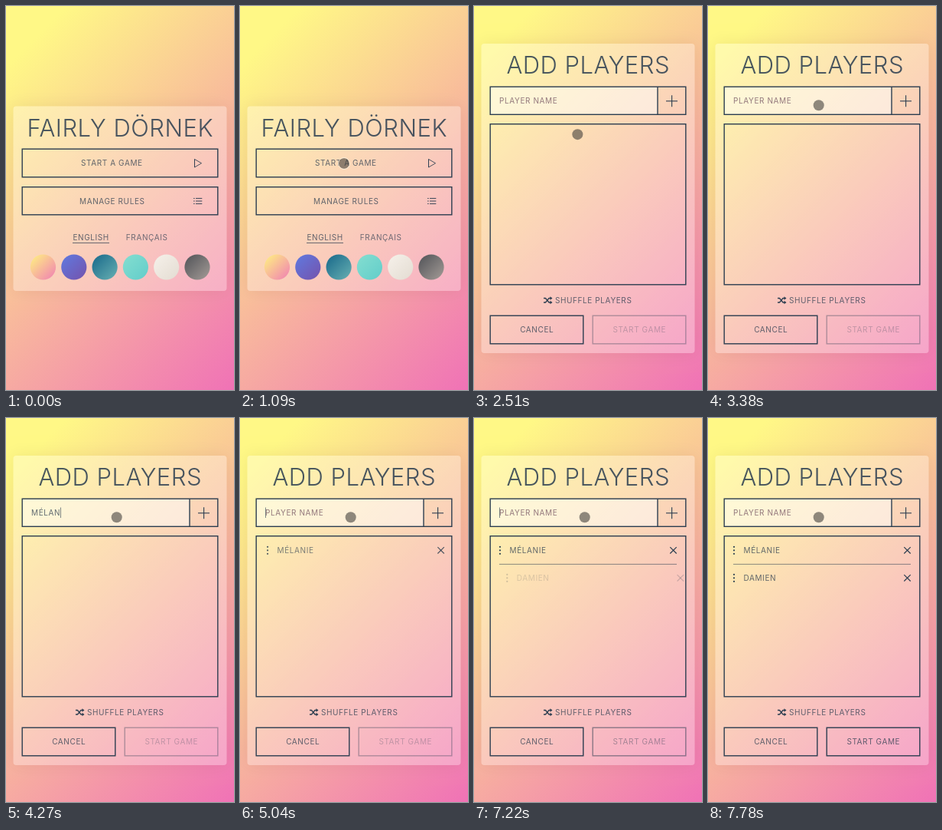
Animation, 298 px wide and 500 px high, one loop 8000 ms. Source, as an HTML page with a canvas:

```html
<!DOCTYPE html>
<html lang="en">
<head>
<meta charset="utf-8">
<title>Add players</title>
<style>
html, body { margin: 0; width: 100%; height: 100%; overflow: hidden; }
canvas { display: block; width: 298px; height: 500px; }
</style>
</head>
<body>
<canvas id="stage"></canvas>
<script>
const W = 298, H = 500, LOOP = 8000, TICK = 110;
const INK = '#2c3e50';
const FONT = 'Inter, "Open Sans", sans-serif';
const canvas = document.getElementById('stage');
const ctx = canvas.getContext('2d');
const dpr = window.devicePixelRatio || 1;
canvas.width = W * dpr;
canvas.height = H * dpr;
ctx.scale(dpr, dpr);

const players = [
  { name: 'MÉLANIE', keys: [3710, 3930, 4040, 4150, 4260, 4380, 4490], added: 4820 },
  { name: 'DAMIEN', keys: [5810, 5910, 6140, 6360, 6460, 6690], added: 7220 }
];
const themes = [
  ['#fff480', '#f07eb4'], ['#5f7ae0', '#7552ac'], ['#17688a', '#68b0b2'],
  ['#84ded0', '#62cdca'], ['#f6f1ea', '#e3dcd2'], ['#505257', '#a49c97']
];

const easeOut = p => 1 - Math.pow(1 - Math.min(1, Math.max(0, p)), 2.2);
const mix = (a, b, p) => a + (b - a) * p;
const ticks = (t, from) => Math.floor((t - from + 6) / TICK);

function diagonal(x, y, w, h, from, to, lead = 0) {
  const cx = x + w / 2, cy = y + h / 2, d = (w + h) / 4;
  const g = ctx.createLinearGradient(cx - d, cy - d, cx + d, cy + d);
  g.addColorStop(lead, from);
  g.addColorStop(1, to);
  return g;
}

function line(points, width = 1, color = INK) {
  ctx.beginPath();
  points.forEach(([x, y], i) => i ? ctx.lineTo(x, y) : ctx.moveTo(x, y));
  ctx.lineWidth = width;
  ctx.strokeStyle = color;
  ctx.stroke();
}

function disc(x, y, r, fill) {
  ctx.beginPath();
  ctx.arc(x, y, r, 0, Math.PI * 2);
  ctx.fillStyle = fill;
  ctx.fill();
}

function box(x, y, w, h) {
  ctx.lineWidth = 1.4;
  ctx.strokeStyle = INK;
  ctx.strokeRect(x + 0.2, y + 0.2, w - 0.4, h - 0.4);
}

function setFont(weight, size, spacing) {
  ctx.font = `${weight} ${size}px ${FONT}`;
  ctx.letterSpacing = spacing + 'px';
}

function label(text, x, y, { align = 'left', alpha = 0.75, color = INK } = {}) {
  ctx.save();
  ctx.globalAlpha *= alpha;
  setFont(400, 10, 0.6);
  ctx.textAlign = align;
  ctx.fillStyle = color;
  ctx.fillText(text, x, y);
  ctx.restore();
}

function title(text, y) {
  ctx.save();
  ctx.globalAlpha = 0.87;
  setFont(300, 31, 0.5);
  ctx.textAlign = 'center';
  ctx.fillStyle = INK;
  ctx.fillText(text, 149.2, y);
  ctx.restore();
}

function card(y, h) {
  const shape = new Path2D();
  shape.roundRect(9.5, y, 279, h, 4);
  const outside = new Path2D();
  outside.rect(0, 0, W, H);
  outside.addPath(shape);
  // The caster sits off stage, so only its shadow shows.
  ctx.save();
  ctx.clip(outside, 'evenodd');
  ctx.shadowColor = 'rgba(60,30,0,.08)';
  ctx.shadowBlur = 22 * dpr;
  ctx.shadowOffsetX = 2 * W * dpr;
  ctx.translate(-2 * W, 0);
  ctx.fillStyle = '#000';
  ctx.fill(shape);
  ctx.restore();
  ctx.fillStyle = 'rgba(255,255,255,.3)';
  ctx.fill(shape);
}

function drawMenu() {
  card(130.5, 240.5);
  title('FAIRLY DÖRNEK', 170);
  box(21, 186, 256, 37);
  box(21, 235.5, 256, 36.5);
  label('START A GAME', 138.3, 208.3, { align: 'center' });
  label('MANAGE RULES', 138.8, 257.7, { align: 'center' });
  const soft = 'rgba(44,62,80,.85)';
  line([[246.5, 199.5], [246.5, 210], [255.5, 204.7], [246.5, 199.5], [246.5, 210]], 1, soft);
  for (const y of [250.5, 254, 257.5]) {
    line([[245, y], [246.7, y]], 1.1, soft);
    line([[248, y], [256.3, y]], 1.1, soft);
  }
  label('ENGLISH', 111.2, 305, { align: 'center' });
  label('FRANÇAIS', 184.2, 305, { align: 'center', alpha: 0.68 });
  line([[87, 308.5], [135, 308.5]], 1, 'rgba(44,62,80,.7)');
  themes.forEach(([from, to], i) => {
    const x = 48.5 + i * 40.3;
    disc(x, 340, 16.6, diagonal(x - 16.5, 323.5, 33, 33, from, to));
  });
}

function drawRow(t, player, y) {
  const p = easeOut((ticks(t, player.added) + 0.5) * TICK / 500);
  ctx.save();
  ctx.globalAlpha = p;
  ctx.translate(mix(12, 0, p), 0);
  for (const dy of [-4.5, 0, 4.5]) disc(34, y + dy, 1.1, INK);
  label(player.name, 46.5, y + 3.8);
  line([[256.3, y - 4.2], [264.7, y + 4.2]], 1.2);
  line([[264.7, y - 4.2], [256.3, y + 4.2]], 1.2);
  ctx.restore();
}

function drawInput(t) {
  ctx.fillStyle = 'rgba(255,255,255,.5)';
  ctx.fillRect(21, 105, 219, 36.5);
  box(21, 105, 256, 36.5);
  line([[240, 105], [240, 141.5]], 1.4);
  line([[251, 123.8], [266, 123.8]], 1.1);
  line([[258.6, 116.3], [258.6, 131.3]], 1.1);

  const typing = players.find(p => t >= p.keys[0] && t < p.added);
  const text = typing ? typing.name.slice(0, typing.keys.filter(k => t >= k).length) : '';
  if (text) label(text, 33, 126.8);
  else label('PLAYER NAME', 33, 126.8, { color: '#70505f' });

  const blink = (from, length) => t >= from && t < from + length;
  if (typing || blink(2950, 430) || players.some(p => blink(p.added, 560))) {
    ctx.save();
    setFont(400, 10, 0.6);
    const x = Math.round(33 + ctx.measureText(text).width) + 0.5;
    ctx.restore();
    line([[x, 116.5], [x, 130]], 1, 'rgba(44,62,80,.6)');
  }
}

function drawShuffle() {
  line([[91, 380.5], [93.5, 380.5], [98, 386], [101, 386]], 1.3);
  line([[91, 386], [93.5, 386], [98, 380.5], [101, 380.5]], 1.3);
  for (const y of [380.5, 386]) {
    ctx.beginPath();
    ctx.moveTo(99.5, y - 2.3);
    ctx.lineTo(102.5, y);
    ctx.lineTo(99.5, y + 2.3);
    ctx.fillStyle = INK;
    ctx.fill();
  }
  label('SHUFFLE PLAYERS', 106, 386.8);
}

function drawPlayers(t) {
  card(49, 403);
  title('ADD PLAYERS', 88.3);
  drawInput(t);

  box(21, 153.5, 256, 209.5);
  players.forEach((p, i) => { if (t >= p.added) drawRow(t, p, 172.3 + i * 36); });
  const ready = players[1].added;
  if (t >= ready) line([[33, 190.4], [265, 190.4]], 1, 'rgba(44,62,80,.55)');

  drawShuffle();
  box(21, 403, 122, 37);
  label('CANCEL', 82.2, 425.4, { align: 'center' });
  ctx.save();
  ctx.globalAlpha = t < ready ? 0.36 : mix(0.36, 1, easeOut((ticks(t, ready) + 0.5) * TICK / 400));
  box(155, 403, 122, 37);
  label('START GAME', 216.3, 425.4, { align: 'center' });
  ctx.restore();
}

function drawPointer(t) {
  if (t < 750) return;
  let x, y;
  if (t < 2390) {
    const p = easeOut(ticks(t, 750) / 3);
    x = mix(165, 136, p);
    y = mix(196, 205, p);
  } else {
    const p = Math.min(1, (ticks(t, 2390) + 1) / 4);
    const s = p * p * (3 - 2 * p);
    x = mix(136, 144.7, s) - 5 * Math.sin(Math.PI * s);
    y = mix(205, 129.3, s);
  }
  disc(x, y, 7, 'rgba(60,58,55,.58)');
  if (t >= 1090 && t < 2390) {
    ctx.lineWidth = 1;
    ctx.strokeStyle = 'rgba(255,250,235,.65)';
    ctx.beginPath();
    ctx.arc(x, y, 7.4, 0, Math.PI * 2);
    ctx.stroke();
  }
}

function frame(now) {
  const t = now % LOOP;
  ctx.fillStyle = diagonal(0, 0, W, H, '#fff886', '#f072b6', 0.1);
  ctx.fillRect(0, 0, W, H);
  if (t < 1740) drawMenu();
  else drawPlayers(t);
  drawPointer(t);
}

const start = performance.now();
function loop() {
  frame(performance.now() - start);
  requestAnimationFrame(loop);
}
loop();
</script>
</body>
</html>
```
